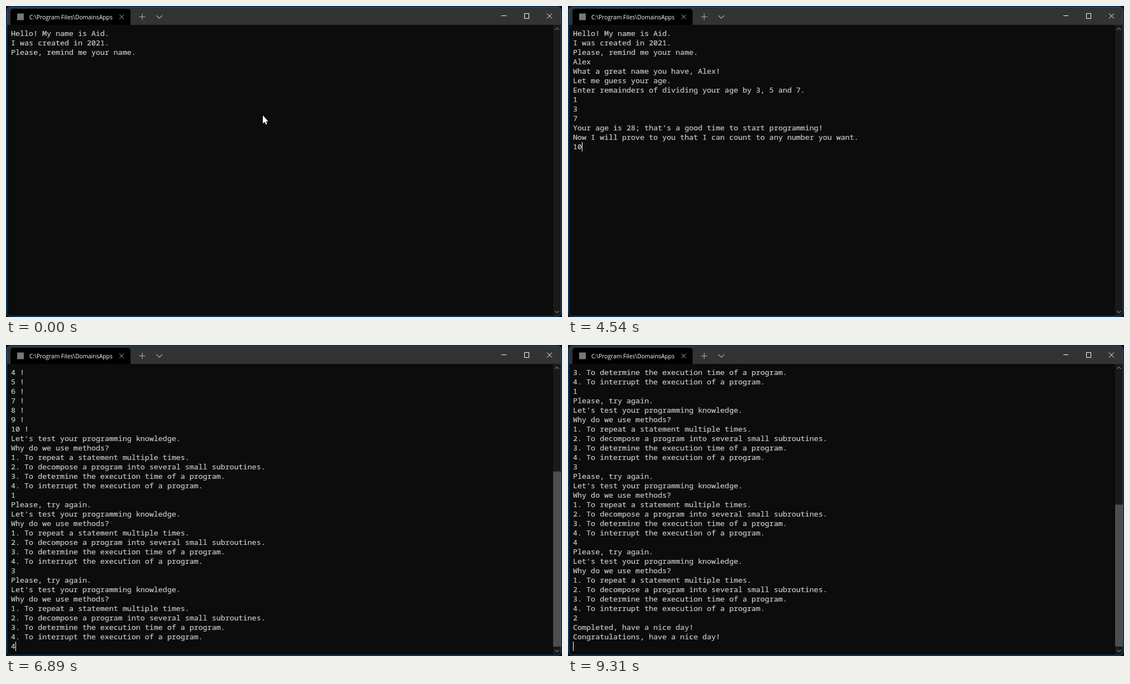
An HTML page for the animation above (9.58 s loop, 1000x560 px).

```html
<!DOCTYPE html>
<html lang="en">
<head>
<meta charset="utf-8">
<title>Console</title>
<style>
html, body { margin: 0; width: 100%; height: 100%; overflow: hidden; background: #07111c; }
#stage { position: relative; width: 1000px; height: 560px; overflow: hidden; }
svg { position: absolute; left: 0; top: 0; }
svg text { font: 10.35px "Open Sans", "Noto Sans", sans-serif; fill: #fff; }
#screen {
  position: absolute; left: 9px; top: 41px; margin: 0; color: #ccc;
  font: 500 13.39px/17px "Noto Sans Mono", "DejaVu Sans Mono", monospace;
  font-variant-ligatures: none; -webkit-text-stroke: .2px #ccc;
}
#caret { position: absolute; width: 1px; height: 17px; background: #fff; }
</style>
</head>
<body>
<div id="stage">
  <svg width="1000" height="560" fill="none">
    <clipPath id="frame"><rect x="1" y="1" width="998" height="558" rx="7.5"/></clipPath>
    <g clip-path="url(#frame)">
      <path fill="#0c0c0c" d="M0 0H1000V560H0z"/>
      <path fill="#333" d="M0 0H1000V34H0z"/>
      <path fill="#1a1a1a" d="M984 34H998V560H984z"/>
      <rect id="thumb" x="984" width="14" fill="#4d4d4d"/>
    </g>
    <rect x="1.5" y="1.5" width="997" height="557" rx="7" stroke="#0a5ca0"/>
    <path fill="#000" d="M8 34V10a5 5 0 0 1 5-5H219a5 5 0 0 1 5 5V34z"/>
    <rect x="20" y="13.5" width="12" height="12" fill="#777"/>
    <text x="42" y="24">C:\Program Files\DomainsApps</text>
    <path stroke="#bbb" d="M204 15.5l8 8m0-8l-8 8"/>
    <path stroke="#aaa" stroke-width="1.2" d="M239.5 19.5h11m-5.5-5.5v11M270.5 17l5.3 5.2 5.3-5.2"/>
    <path stroke="#fff" d="M891 17.5h9M932.5 13.5h8v9h-8zM973 13.5l9 9m0-9l-9 9"/>
    <path stroke="#bbb" d="M987.5 43l3.5-3.5 3.5 3.5M987.5 549l3.5 3.5 3.5-3.5"/>
  </svg>
  <pre id="screen"></pre>
  <div id="caret"></div>
  <svg width="1000" height="560">
    <path id="mouse" fill="#fff" d="M462 197v14.6l3.3-3 2.2 4.8 2.1-1-2.1-4.7h4.2z"/>
  </svg>
</div>
<script>
const LOOP = 9580, ROWS = 30, ROW_H = 17, COL_W = 8.034, LEFT = 9, TOP = 41;
const TRACK_TOP = 49, TRACK_H = 494;

const quiz = `Let's test your programming knowledge.
Why do we use methods?
1. To repeat a statement multiple times.
2. To decompose a program into several small subroutines.
3. To determine the execution time of a program.
4. To interrupt the execution of a program.
`;
const retry = "Please, try again.\n" + quiz;
const count = Array.from({ length: 11 }, (_, i) => i + " !\n").join("");

// [time, text added to the console]
const steps = [
  [0, "Hello! My name is Aid.\nI was created in 2021.\nPlease, remind me your name.\n"],
  [370, "A"], [540, "l"], [700, "e"], [860, "x"], [1220, "\n"],
  [1240, "What a great name you have, Alex!\nLet me guess your age.\n" +
    "Enter remainders of dividing your age by 3, 5 and 7.\n"],
  [2260, "1"], [2580, "\n"], [2790, "3"], [3000, "\n"], [3200, "7"], [3520, "\n"],
  [3540, "Your age is 28; that's a good time to start programming!\n" +
    "Now I will prove to you that I can count to any number you want.\n"],
  [4250, "1"], [4540, "0"], [5050, "\n"], [5080, count + quiz],
  [5750, "1"], [6020, "\n"], [6040, retry],
  [6310, "3"], [6550, "\n"], [6570, retry],
  [6890, "4"], [7240, "\n"], [7260, retry],
  [7690, "2"],
  [8230, "\nCompleted, have a nice day!\nCongratulations, have a nice day!\n"]
];
const caretOff = [[0, 20], [1830, 2240], [4120, 4230], [5620, 5730], [8810, 9310]];
const mouseOn = [[0, 370], [1860, 2240]];

const [screenEl, caret, thumb, mouse] =
  ["screen", "caret", "thumb", "mouse"].map(id => document.getElementById(id));
const within = (spans, t) => spans.some(([from, to]) => t >= from && t < to);
const show = (el, on) => { el.style.visibility = on ? "visible" : "hidden"; };

function draw(t) {
  const lines = steps.filter(s => s[0] <= t).map(s => s[1]).join("").split("\n");
  const hidden = Math.max(0, lines.length - ROWS);
  const view = lines.slice(hidden);
  const text = view.join("\n");
  if (screenEl.textContent !== text) screenEl.textContent = text;

  caret.style.left = LEFT + Math.floor(view[view.length - 1].length * COL_W) + "px";
  caret.style.top = TOP + (view.length - 1) * ROW_H + "px";
  show(caret, !within(caretOff, t));
  show(mouse, within(mouseOn, t));

  const offset = TRACK_H * hidden / lines.length;
  thumb.setAttribute("y", TRACK_TOP + offset);
  thumb.setAttribute("height", TRACK_H - offset);
  show(thumb, hidden > 0);
}

const start = performance.now();
function tick() {
  draw((performance.now() - start) % LOOP);
  requestAnimationFrame(tick);
}
tick();
</script>
</body>
</html>
```
